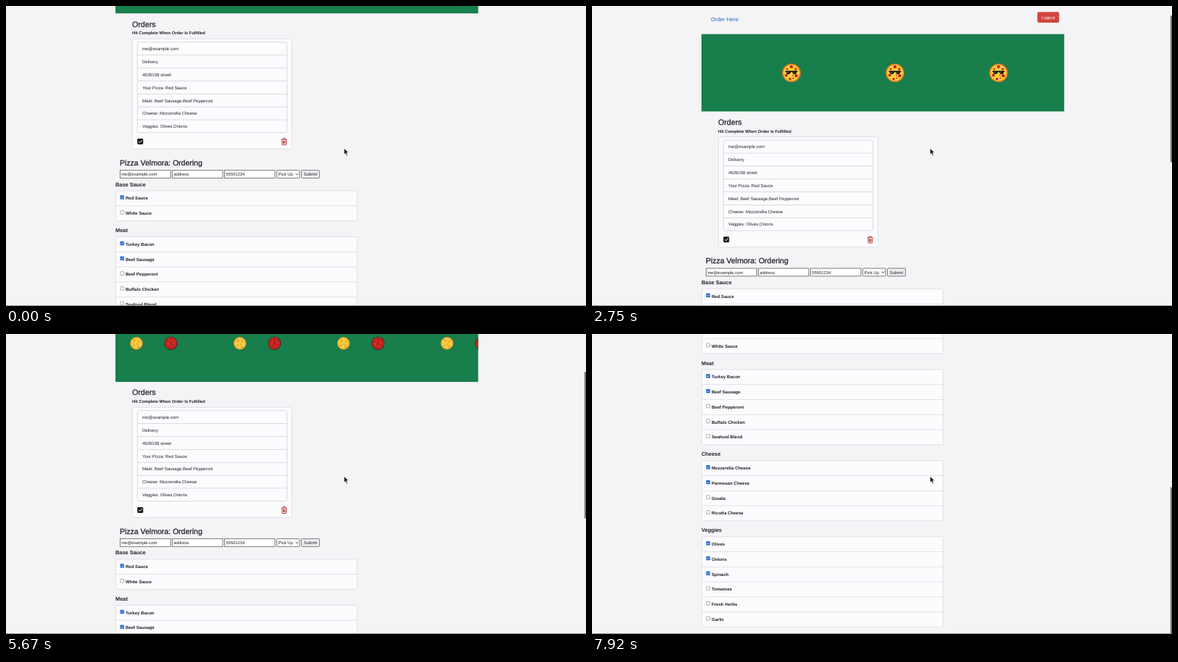
Write an HTML page that moves like this. It is 800 px wide and 414 px high and loops after 8000 ms.

```html
<!DOCTYPE html>
<html lang="en">
<head>
<meta charset="utf-8">
<title>Pizza orders</title>
<style>
html, body { margin: 0; width: 100%; height: 100%; overflow: hidden; background: #f4f3f6; }
svg { display: block; width: 800px; height: 414px; font-family: "Liberation Sans", Arial, sans-serif; text-rendering: geometricPrecision; }
text { white-space: pre; }
</style>
</head>
<body>
<svg id="stage" viewBox="0 0 800 414"></svg>
<script>
const LOOP = 8000, FPS = 12;
const INK = '#212027', PANEL = '#fcfbfe', LINE = '#dbdade';
const TILE = 142.8, BANNER_Y = 119;
const VIEW = 414, MAX_SCROLL = 431.5;
const THUMB = VIEW * VIEW / (VIEW + MAX_SCROLL);

// Markup helpers; label() centres its text vertically on y.
const rect = (x, y, w, h, fill, more = '') =>
  `<rect x="${x}" y="${y}" width="${w}" height="${h}" fill="${fill}" ${more}/>`;
const circle = (x, y, r, fill, more = '') =>
  `<circle cx="${x}" cy="${y}" r="${r}" fill="${fill}" ${more}/>`;
const path = (d, stroke, width, more = '') =>
  `<path d="${d}" fill="none" stroke="${stroke}" stroke-width="${width}" ${more}/>`;
const label = (x, y, size, str, more = '') =>
  `<text x="${x}" y="${y + size * .35}" font-size="${size}" fill="${INK}" ${more}>${str}</text>`;
const panel = (x, y, w, h, stroke = LINE) =>
  rect(x, y, w, h, PANEL, `rx="2" stroke="${stroke}" stroke-width=".8"`);
const BOLD = 'font-weight="700"';
const MEDIUM = `stroke="${INK}" stroke-width=".25"`;

function header() {
  return label(164, 45.3, 7.6, 'Order Here', 'style="fill:#1c6fc4"') +
    rect(614.3, 35, 30, 14.7, '#d2443f', 'rx="2"') +
    label(629.3, 42.3, 6, 'Logout', 'style="fill:#fff" text-anchor="middle"');
}

function pizza() {
  const spots = [[0, -13, 3.4], [-9, -8, 2], [9, -8, 2.6], [-11, 5, 3], [-3, 13, 2.6], [10, 6, 3.4], [4, 11, 1.6], [3, 5, 1.4]];
  return circle(0, 0, 19.4, '#f39a2c', 'stroke="#c9631c" stroke-width="1.2"') +
    circle(0, 0, 16.5, '#f9cf3c') +
    spots.map(([x, y, r]) => circle(x, y, r, '#c3201c')).join('') +
    '<path d="M-13-4.5H13V-2H11.500L9 2.500H4L1.500-1.500H-1.500L-4 2.500H-9L-11.500-2H-13Z" fill="#111"/>' +
    path('M-8.500-2l2.500 2.500M4-2l2.500 2.500', '#eee', 1);
}

function word() {
  const z = x => `M${x}-20h16.500L${x + 3.5} 20h16.500`;
  return path('M-52 23.500V-20h8q6.500 0 6.500 6.500v9q0 6.500-6.500 6.500h-8M-25.500-23.500v47' + z(-18) + z(6.5) +
    'M33.500 23.500L42-20h2l8.500 43.500M37 13h12', '#d9e0dd', 7);
}

function sauce() {
  return circle(0, 0, 8.4, '#e42d25', 'stroke="#571512" stroke-width="1.2"') +
    circle(0, 0, 5.8, 'none', 'stroke="#7d1714" stroke-width=".8"') +
    path('M-5-3L5 3M-4 4L4-4M0-6V6', '#8c1915', .9);
}

function cheese() {
  const holes = [[-3, -4, 1.5], [3.5, -3, 1.2], [-4, 3, 1.2], [1, 1, 1], [3, 5, 1.5]];
  return circle(0, 0, 8.3, '#f8ca3f', 'stroke="#d98e26" stroke-width="1"') +
    holes.map(([x, y, r]) => circle(x, y, r, '#e0a02c')).join('');
}

function banner() {
  let tiles = '';
  for (let i = 0; i < 5; i++)
    tiles += `<use href="#tile" x="${132.3 + i * TILE}" y="${BANNER_Y}"/>`;
  return rect(151, 65.5, 500.3, 106.7, '#187e4c') + `<g clip-path="url(#strip)">${tiles}</g>`;
}

function orders() {
  const rows = ['me@example.com', 'Delivery', '4926158 street', 'Your Pizza: Red Sauce',
    'Meat: Beef Sausage,Beef Pepperoni', 'Cheese: Mozzerella Cheese', 'Veggies: Olives,Onions'];
  const step = 17.85;
  return label(174, 186.8, 10.7, 'Orders', MEDIUM) +
    label(174, 199.4, 5.8, 'Hit Complete When Order Is Fulfilled', BOLD) +
    panel(174.5, 207.3, 219.8, 152) +
    panel(181.3, 211.8, 206.2, step * 7, '#d2d1d6') +
    rows.map((str, i) => label(188, 221 + i * step, 6, str) +
      (i ? rect(181.3, 211.5 + i * step, 206.2, .8, '#d2d1d6') : '')).join('') +
    rect(181.2, 345, 8, 8, '#1b1a1e', 'rx="1.4"') +
    path('M183 349l1.700 1.700L187.700 347', '#fff', 1) +
    path('M379.800 346.400h7.800M382 346v-1.300h3.400V346M380.600 346.600l.5 7h5.200l.5-7M382.500 348v4M383.700 348v4M384.900 348v4', '#a3221f', .85);
}

function form() {
  const field = (x, str) => rect(x, 388.7, 69.6, 10.8, '#fff', 'stroke="#6d6c70" stroke-width=".9"') +
    label(x + 1.8, 394.3, 5.9, str);
  return label(157, 378.3, 10.5, 'Pizza Velmora: Ordering', MEDIUM) +
    field(157.4, 'me@example.com') + field(229.4, 'address') + field(301.4, '55501234') +
    rect(373.6, 388.7, 31.2, 10.8, '#fff', 'rx="1" stroke="#6d6c70" stroke-width=".9"') +
    label(375.5, 394.3, 5.9, 'Pick Up') +
    path('M399.600 393.300l1.800 1.800l1.800-1.800', INK, .9) +
    rect(407.4, 388.7, 25, 10.8, '#efeef1', 'rx="1" stroke="#6d6c70" stroke-width=".9"') +
    label(419.9, 394.3, 5.9, 'Submit', 'text-anchor="middle"');
}

function tick(y, on) {
  return on
    ? rect(157.5, y - 2.7, 5.4, 5.4, '#1667d9', 'rx=".9"') + path(`M158.700 ${y}l1.200 1.300l2-2.700`, '#fff', .8)
    : rect(157.8, y - 2.4, 4.8, 4.8, '#fff', 'rx=".8" stroke="#77767a" stroke-width=".6"');
}

// Each menu: title, number of ticked items, items.
function menus() {
  const step = 20.75;
  let top = 417, out = '';
  for (const [title, on, ...items] of [
    ['Base Sauce', 1, 'Red Sauce', 'White Sauce'],
    ['Meat', 2, 'Turkey Bacon', 'Beef Sausage', 'Beef Pepperoni', 'Buffalo Chicken', 'Seafood Blend'],
    ['Cheese', 2, 'Mozzerella Cheese', 'Parmesan Cheese', 'Gouda', 'Ricotta Cheese'],
    ['Veggies', 3, 'Olives', 'Onions', 'Spinach', 'Tomatoes', 'Fresh Herbs', 'Garlic']
  ]) {
    out += label(151, top - 9, 7.4, title, BOLD) + panel(151.3, top, 333, items.length * step);
    items.forEach((str, i) => {
      const y = top + (i + .49) * step;
      if (i) out += rect(151.3, top + i * step - .4, 333, .8, LINE);
      out += tick(y - 1.2, i < on) + label(165, y, 6.05, str, BOLD);
    });
    top += items.length * step + 22;
  }
  return out;
}

const stage = document.getElementById('stage');
stage.innerHTML = `<defs>
  <clipPath id="strip">${rect(151, 65.5, 500.3, 106.7, '#000')}</clipPath>
  <g id="tile">
    <g id="word">${word()}</g>
    <g id="sauce">${sauce()}</g><g id="cheese">${cheese()}</g>
    ${path('M-14-15L-27-28M-13 15L-25 29M24 2L39 3.700', '#fff', 1.5, 'id="burst"')}
    <g id="pizza">${pizza()}</g>
  </g></defs>
  ${rect(0, 0, 800, 414, '#f4f3f6')}
  <g id="page">${header()}${banner()}${orders()}${form()}${menus()}</g>
  ${rect(797.8, 0, 2.2, THUMB, '#77767b', 'id="thumb" rx="1"')}
  ${rect(0, 413, 800, 1, '#8d8c90')}
  <path d="M466.200 196.200v8.800l2-1.800l1.500 3.200l1.600-.7l-1.500-3.200h2.700z" fill="#111" stroke="#fff" stroke-width=".7"/>`;

const part = {};
for (const id of ['page', 'thumb', 'word', 'sauce', 'cheese', 'burst', 'pizza'])
  part[id] = document.getElementById(id);

const ramp = (t, a, b) => Math.min(1, Math.max(0, (t - a) / (b - a)));
const ease = u => u * u * (3 - 2 * u);

// Smooth monotone curve through [time, value] points.
function curve(points) {
  const slope = i => (points[i + 1][1] - points[i][1]) / (points[i + 1][0] - points[i][0]);
  const tangents = points.map((p, i) => {
    if (!i || i === points.length - 1) return 0;
    const a = slope(i - 1), b = slope(i);
    return a * b > 0 ? 2 * a * b / (a + b) : 0;
  });
  return t => {
    let i = 0;
    while (i < points.length - 2 && t > points[i + 1][0]) i++;
    const [t0, v0] = points[i], [t1, v1] = points[i + 1];
    const d = t1 - t0, u = ramp(t, t0, t1), w = ease(u);
    return v0 * (1 - w) + v1 * w + d * u * (1 - u) * (tangents[i] * (1 - u) - tangents[i + 1] * u);
  };
}

const scrollAt = curve([[0, 162], [850, 0], [1900, 0], [2500, 26.7], [5000, 26.7], [5670, 106.6], [6920, 341], [7500, MAX_SCROLL], [8000, MAX_SCROLL]]);
const sizeAt = curve([[0, .8], [1750, .8], [2500, .65], [3900, .65], [4300, 1.06], [4500, 1], [4950, 1], [5250, 0], [8000, 0]]);

function thumbAlpha(t) {
  if (t < 1850) return ramp(t, 0, 170) * (1 - .7 * ramp(t, 1450, 1750));
  return t < 5000 ? 1 - ramp(t, 2950, 3300) : ramp(t, 5000, 5170);
}

function draw(t) {
  const scroll = scrollAt(t);
  part.page.setAttribute('transform', `translate(0 ${-scroll})`);
  part.thumb.setAttribute('y', scroll * (VIEW - THUMB) / MAX_SCROLL);
  part.thumb.setAttribute('opacity', thumbAlpha(t));

  const spread = ease(ramp(t, 650, 1000)) * (1 - ease(ramp(t, 2200, 2500)));
  part.word.setAttribute('transform', `scale(${spread} 1)`);
  part.word.setAttribute('opacity', spread > 0 ? 1 : 0);
  part.pizza.setAttribute('transform', `scale(${sizeAt(t)})`);
  part.burst.setAttribute('opacity', t >= 4300 && t < 4800 ? 1 : 0);
  part.burst.setAttribute('transform', `scale(${.8 + .2 * ramp(t, 4300, 4500)})`);

  const apart = 47.6 * ease(ramp(t, 5100, 5600));
  part.sauce.setAttribute('transform', `translate(${-apart})`);
  part.cheese.setAttribute('transform', `translate(${apart})`);
  for (const el of [part.sauce, part.cheese]) el.setAttribute('opacity', t > 5100 ? 1 : 0);
}

const start = performance.now();
function loop() {
  const t = (performance.now() - start) % LOOP;
  draw(Math.floor((t + 4) * FPS / 1000) * 1000 / FPS % LOOP);
  requestAnimationFrame(loop);
}
loop();
</script>
</body>
</html>
```
